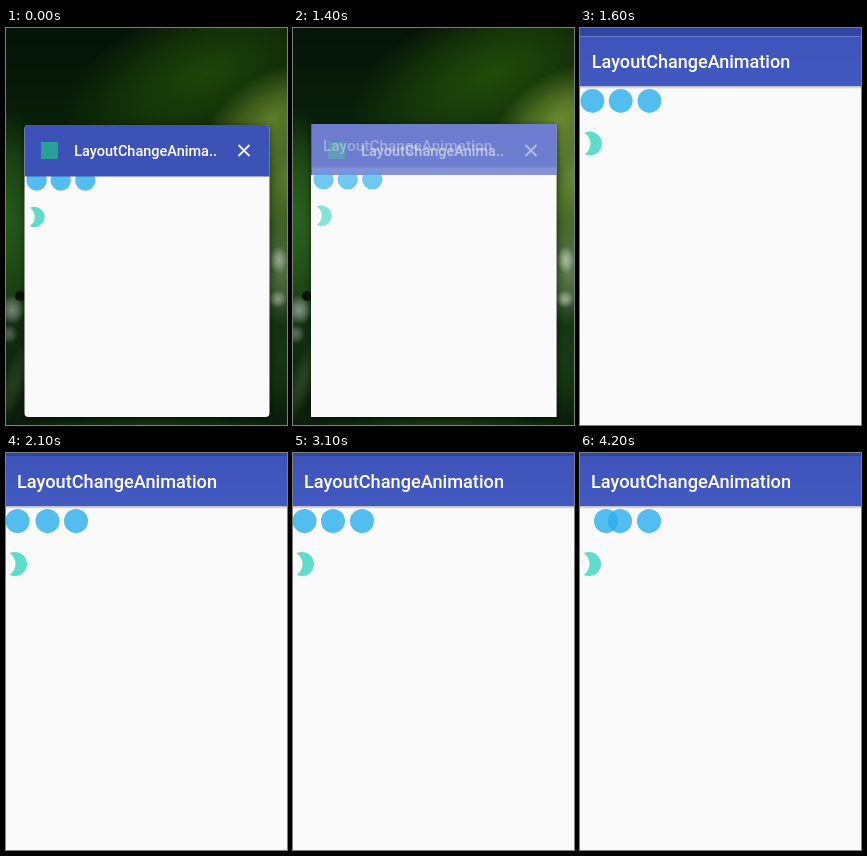
These frames come from a looping animation (281 by 397 pixels, 4300 ms). An HTML page with a canvas:

```html
<!DOCTYPE html>
<html lang="en">
<head>
<meta charset="utf-8">
<title>Layout change animation</title>
<style>
  html, body { margin: 0; width: 100%; height: 100%; overflow: hidden; background: #0a1c0c; }
  canvas { display: block; }
</style>
</head>
<body>
<canvas id="stage" width="281" height="397"></canvas>
<script>
const W = 281, H = 397, LOOP = 4300, STEP = 100;
const ctx = document.getElementById('stage').getContext('2d');
const FONT = 'Roboto, "Noto Sans", sans-serif';
const clamp = u => Math.min(1, Math.max(0, u));
const mix = (a, b, u) => a + (b - a) * u;

function rect(x, y, w, h, fill) {
  ctx.fillStyle = fill;
  ctx.fillRect(x, y, w, h);
}

function label(text, x, y, size, fill = '#fff') {
  ctx.font = `500 ${size}px ${FONT}`;
  ctx.fillStyle = fill;
  ctx.fillText(text, x, y);
}

function disc(x, y, r, fill) {
  ctx.fillStyle = fill;
  ctx.beginPath();
  ctx.arc(x, y, r, 0, 2 * Math.PI);
  ctx.fill();
}

function gradient(x0, y0, x1, y1, colors) {
  const g = ctx.createLinearGradient(x0, y0, x1, y1);
  colors.forEach((c, i) => g.addColorStop(i / (colors.length - 1), c));
  return g;
}

// Soft elliptical glow; rgb is "r,g,b"
function glow(x, y, rx, ry, rgb, alpha, turn = 0) {
  ctx.save();
  ctx.translate(x, y);
  ctx.rotate(turn);
  ctx.scale(rx, ry);
  const g = ctx.createRadialGradient(0, 0, 0, 0, 0, 1);
  g.addColorStop(0, `rgba(${rgb},${alpha})`);
  g.addColorStop(0.5, `rgba(${rgb},${alpha * 0.6})`);
  g.addColorStop(1, `rgba(${rgb},0)`);
  rect(-1, -1, 2, 2, g);
  ctx.restore();
}

function wallpaper(t) {
  rect(0, 0, W, H, gradient(0, 0, 0, H, ['#05130a', '#0a2109', '#153f12', '#12300f', '#0a1f0b']));
  glow(200, 45, 150, 75, '42,92,10', 0.75, -0.4);
  glow(0, 190, 50, 110, '48,104,32', 0.85);
  glow(265, 92, 80, 45, '116,148,48', 0.9, -0.6);
  glow(280, 150, 40, 90, '106,142,52', 0.95);
  glow(276, 245, 26, 55, '112,140,92', 0.8);
  glow(276, 330, 30, 60, '24,64,20', 0.8);
  // Water drops on the leaves
  glow(273, 232, 9, 14, '190,206,180', 0.8);
  glow(272, 271, 9, 9, '176,194,170', 0.8);
  glow(6, 282, 13, 15, '150,166,152', 0.85);
  glow(3, 306, 9, 10, '124,142,126', 0.7);
  disc(14, 268, 5, '#0a140c');
  glow(8, 355, 14, 50, '58,88,44', 0.6, 0.4);
  glow(150, 397, 130, 10, '34,74,26', 0.6);
  if (t < 200) rect(0, 3, W, H, 'rgba(0,18,0,.12)');
}

function moon() {
  ctx.fillStyle = '#60dccb';
  ctx.beginPath();
  ctx.arc(9, 111, 12, -2.047, 2.047);
  ctx.arc(-3, 111, 12.5, 1.025, -1.025, true);
  ctx.fill();
}

function shapes(t) {
  const slide = clamp((t - 3300) / 900);
  const shift = t < 2100 ? 0 : 1 - clamp((t - 2100) / 900);
  const xs = [
    11.5 + 14.5 * (1 - Math.pow(1 - slide, 1.17)),
    40 + 1.5 * shift,
    69 + shift
  ];
  xs.forEach(x => disc(x, 68, 12, 'rgba(41,174,236,.8)'));
  moon();
}

function place(x, y, s, draw) {
  ctx.save();
  ctx.translate(x, y);
  ctx.scale(s, s);
  draw();
  ctx.restore();
}

function app(t) {
  rect(-2.2, -20, 292, 520, '#fafafa');
  rect(-2.2, -20, 292, 23, '#3045a4');
  rect(-2.2, 3, 292, 50, gradient(0, 3, 0, 53, ['#3f54ba', '#4159c0']));
  rect(-2.2, 53, 292, 3, gradient(0, 53, 0, 56, ['rgba(0,0,0,.28)', 'rgba(0,0,0,0)']));
  label('LayoutChangeAnimation', 10.9, 35, 18.2);
  shapes(t);
}

function card(t) {
  const opening = t >= 1400;
  const left = opening ? 18 : 18.5, top = opening ? 96 : 97;
  const blue = t < 200 ? '#3d52b7' : '#485bc6';
  const cardPath = () => {
    ctx.beginPath();
    ctx.roundRect(left, top, 263.5 - left, 389 - top, opening ? 0 : 4);
  };
  ctx.save();
  ctx.shadowColor = 'rgba(0,0,0,.5)';
  ctx.shadowBlur = 6;
  ctx.shadowOffsetY = 1;
  ctx.fillStyle = '#fafafa';
  cardPath();
  ctx.fill();
  ctx.restore();

  ctx.save();
  cardPath();
  ctx.clip();
  place(20.9, opening ? 93.7 : 95, 0.846, () => shapes(t));
  rect(left, top, 246, opening ? 51 : 51.5, blue);
  rect(35, 114, 17, 17, '#2aa198');
  label('LayoutChangeAnima..', 68.2, 128, 14.5);
  ctx.strokeStyle = 'rgba(255,255,255,.9)';
  ctx.lineWidth = 1.8;
  ctx.beginPath();
  ctx.moveTo(232.5, 117); ctx.lineTo(243.5, 128);
  ctx.moveTo(243.5, 117); ctx.lineTo(232.5, 128);
  ctx.stroke();

  if (opening) {
    ctx.globalAlpha = 0.35;
    place(20.8, 93.7, 0.846, () => app(t));
  }
  ctx.restore();
}

function render(t) {
  wallpaper(t);
  if (t < 1500) return card(t);
  const u = 1 - Math.pow(1 - clamp((t - 1500) / 400), 3);
  place(mix(2.4, 0, u), mix(13, 0, u), mix(0.98, 1, u), () => app(t));
}

const start = performance.now();
function frame() {
  const t = (performance.now() - start) % LOOP;
  render(Math.floor(t / STEP) * STEP);
  requestAnimationFrame(frame);
}
frame();
</script>
</body>
</html>
```
